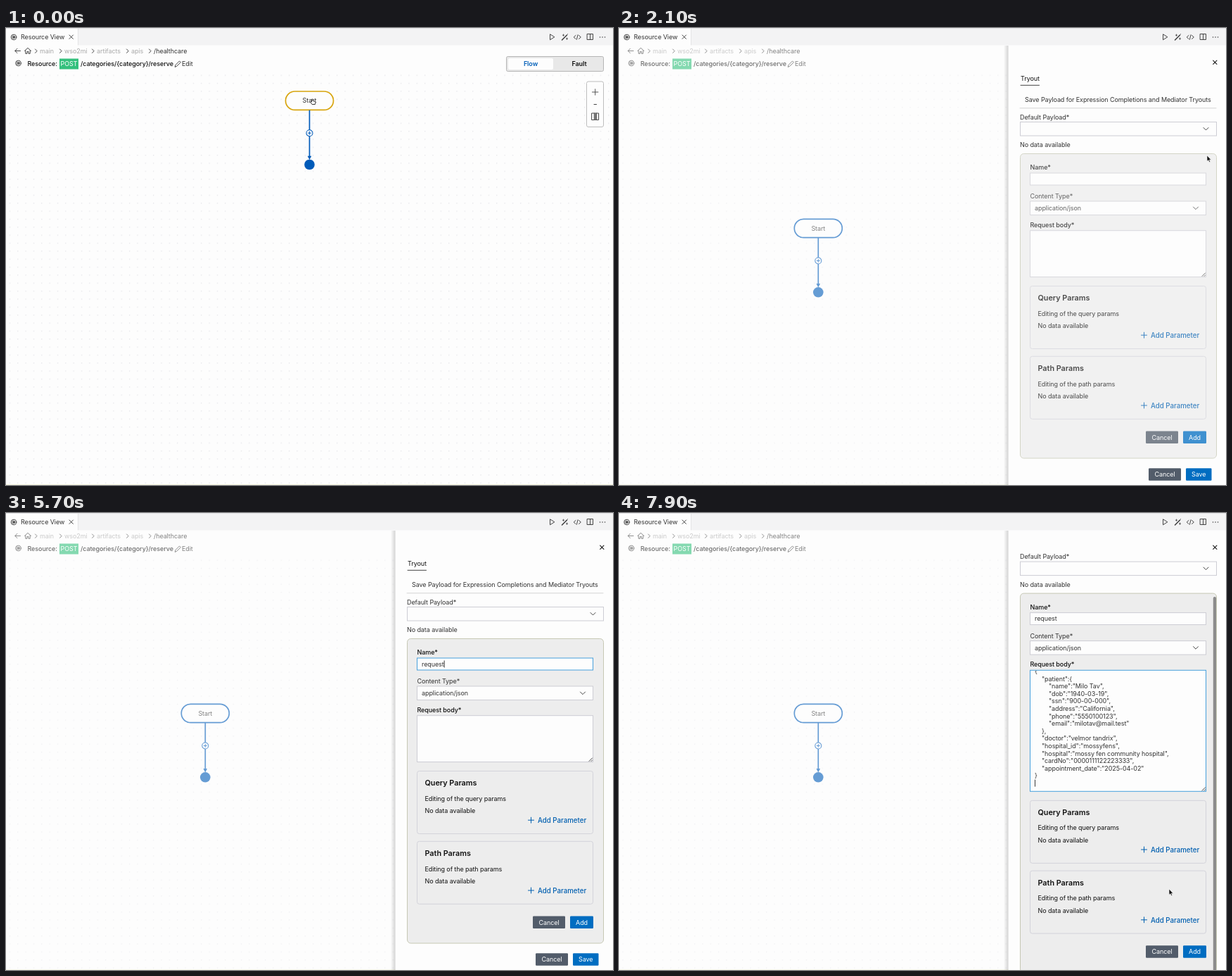
An HTML page for the animation above (8 s loop, 863 by 649 pixels).

```html
<!DOCTYPE html>
<html lang="en">
<head>
<meta charset="utf-8">
<title>Resource View</title>
<style>
html, body { margin: 0; width: 100%; height: 100%; overflow: hidden; background: #fdfdfd; }
svg { display: block; width: 863px; height: 649px; }
text { font: 9px Inter, "Open Sans", sans-serif; letter-spacing: -.09px; fill: #333; white-space: pre; }
.med { font-weight: 500; fill: #111; }
.dark { fill: #111; }
.head { font-size: 10.8px; font-weight: 600; letter-spacing: 0; fill: #111; }
.link { font-size: 9.7px; font-weight: 500; letter-spacing: 0; fill: #005fb0; }
.crumb { fill: #a9a9a9; }
.white { fill: #fff; }
.mid { text-anchor: middle; }
.bold { font-weight: 600; fill: #111; }
.blue { fill: #005fb8; }
.line { fill: none; stroke: #444; stroke-width: 1; stroke-linecap: round; stroke-linejoin: round; }
.box { fill: #fdfdfd; stroke: #cdcdd4; }
.card { fill: none; stroke: #d3d3da; }
</style>
</head>
<body>
<svg id="stage" viewBox="0 0 863 649"></svg>
<script>
const LOOP = 8000, GROWTH = 106.2, SCROLL = 64.4;
const BLUE = '#005bb9', FOCUS = '#47a0dc';
const stage = document.getElementById('stage');

// Text is placed by its vertical centre.
const text = (x, y, s, cls = '') => `<text x="${x}" y="${y + 3.2}" class="${cls}">${s}</text>`;
const line = (d, attrs = '') => `<path class="line" d="${d}" ${attrs}/>`;
const rect = (x, y, w, h, attrs = '') => `<rect x="${x}" y="${y}" width="${w}" height="${h}" ${attrs}/>`;
const chevron = (x, y) => line(`M${x - 3.5} ${y - 1.7}l3.5 3.5 3.5-3.5`);
const plus = (x, y, r, stroke) => line(`M${x - r} ${y}h${2 * r}M${x} ${y - r}v${2 * r}`, `style="stroke:${stroke}"`);
const button = (x, y, w, label, fill) =>
  rect(x, y - 9, w, 17.5, `rx="1.2" fill="${fill}"`) + text(x + w / 2, y, label, 'white mid');
const buttons = (x, y, label, w) =>
  button(x, y, 46, 'Cancel', '#525c6a') + button(x + 53, y, w, label, '#006dc1');
const gear = (x, y) => `<g class="line" transform="translate(${x} ${y})">
  <circle r="3.8"/><circle r="1.9" stroke-width=".8"/><circle r=".6" fill="#333"/>
  <path d="M-2.7-2.7l5.4 5.4M2.7-2.7l-5.4 5.4" stroke-width=".5"/></g>`;

const tabBar = () => rect(0, 0, 863, 24.5, 'fill="#f3f3f4"') + rect(0, 0, 102, 25, 'fill="#fdfdfd"') +
  line('M0 .5H863M102.5 1V24', 'style="stroke:#e4e4e6"') + gear(11, 13) +
  text(21, 12.7, 'Resource View') + line('M90 10l5.4 5.4M95.4 10l-5.4 5.4') +
  line('M773.5 9.2v7.6l6-3.8z') +
  line('M790.5 17l7-7', 'style="stroke-width:1.6"') +
  line('M792.5 9v2.4M791.3 10.2h2.4M797.5 14v2.4M796.3 15.2h2.4M798.5 8.6v.2', 'style="stroke-width:.8"') +
  line('M810 10.5l-2.8 2.5 2.8 2.5M814.5 10.5l2.8 2.5-2.8 2.5M813 9.7l-1.6 6.6') +
  line('M826.5 8.5h8v8h-8zM830.5 8.5v8') +
  [844.5, 848, 851.5].map(x => `<circle cx="${x}" cy="13" r=".8" fill="#444"/>`).join('');

const header = () => {
  const crumbs = [[48, 'main'], [83, 'wso2mi'], [129, 'artifacts'], [178, 'apis'], [210, '/healthcare']];
  return line('M20.5 32.5h-7.5M16 29.3l-3.2 3.2 3.2 3.2') +
    line('M26.5 32.5l4.5-4.2 4.5 4.2M27.8 32v4.3h2.2v-2.8h2v2.8h2.2V32') +
    crumbs.map(([x, s], i) => line(`M${x - 6.5} 30l2.6 2.7-2.6 2.7`) +
      text(x, 32.4, s, i < 4 ? 'crumb' : '')).join('') +
    gear(17.5, 50) + text(30.5, 50.7, 'Resource:', 'med') +
    rect(76, 43.5, 27, 15, 'fill="#34c07d"') + text(89.5, 51, 'POST', 'white mid') +
    text(106, 50.7, '/categories/{category}/reserve', 'med') +
    line('M240.3 55l.8-2.6 5.5-5.5 1.8 1.8-5.5 5.5z') + text(250, 50.7, 'Edit');
};

const controls = () =>
  rect(711.5, 40.5, 138, 21, 'rx="2" fill="#e8e8e8" stroke="#b5b5b5"') +
  rect(714, 43, 64, 16, 'rx="2" fill="#fdfdfd"') +
  text(746, 50.7, 'Flow', 'bold blue mid') + text(815, 50.7, 'Fault', 'bold mid') +
  rect(825.5, 76, 24, 64.5, 'rx="2.5" fill="#fdfdfd" stroke="#bdbdbd"') +
  plus(837.7, 91, 4.2, '#555') + line('M836 108.5h3.5') +
  line('M833 121h9.6v9.5H833zM836.3 121v9.5M839.4 121v9.5') + rect(836.3, 121, 3.1, 9.5, 'fill="#777"');

const diagram = () => `<g id="diagram">
  <rect id="start" x="-34" y="-13.2" width="68" height="26.4" rx="13.2" fill="#fdfdfd" stroke-width="1.7"/>
  ${text(0, 0, 'Start', 'mid')}
  <path d="M0 13.5V80" stroke="${BLUE}" stroke-width="1.7"/>
  <path d="M-2.8 78.5H2.8L0 84z" fill="${BLUE}"/>
  <circle cy="46" r="4.5" fill="#fdfdfd" stroke="${BLUE}" stroke-width="1.1"/>
  ${plus(0, 46, 2, BLUE)}<circle cy="90.8" r="7.3" fill="${BLUE}"/></g>`;

const params = (y, title, kind) =>
  rect(584.5, y, 250, 89, 'rx="3" class="card"') + text(595.5, y + 17.5, title, 'head') +
  text(595.5, y + 39, `Editing of the ${kind} params`, 'dark') +
  text(595.5, y + 56.7, 'No data available', 'dark') +
  plus(746.5, y + 69.7, 4, '#005fb0') + text(756, y + 70.3, 'Add Parameter', 'link');

const body = [
  [0, '{'], [1, '"patient":{'], [2, '"name":"Milo Tav",'], [2, '"dob":"1940-03-19",'],
  [2, '"ssn":"900-00-000",'], [2, '"address":"California",'], [2, '"phone":"5550100123",'],
  [2, '"email":"milotav@mail.test"'], [1, '},'], [1, '"doctor":"velmor tandrix",'],
  [1, '"hospital_id":"mossyfens",'], [1, '"hospital":"mossy fen community hospital",'],
  [1, '"cardNo":"0000111122223333",'], [1, '"appointment_date":"2025-04-02"'], [0, '}']];

const form = () => `<g id="form">
  <rect id="sheet" x="570.5" y="178.5" width="279" height="432.5" rx="5" fill="#ededed" stroke="#c6c8b4"/>
  ${text(584.5, 198, 'Name*', 'med')}
  ${rect(584.5, 206, 250, 17, 'id="nameBox" class="box"')}
  <text id="name" x="591" y="217.8"></text>
  ${text(584.5, 239, 'Content Type*')}${rect(584.5, 246, 250, 19.5, 'class="box"')}
  ${text(591, 255.8, 'application/json')}${chevron(820, 255.8)}
  ${text(584.5, 279.7, 'Request body*', 'med')}
  ${rect(584.5, 287.7, 250, 65.8, 'id="bodyBox" class="box"')}
  <g id="body" clip-path="url(#bodyClip)">
    ${body.map(([depth, s], i) => text(591 + depth * 10, 289.3 + i * 10.6, s)).join('')}</g>
  <path id="caret" stroke="#222" stroke-width=".9"/>
  <g id="below">${line('M829 352.5l4.5-4.5M832 352.5l1.5-1.5', 'stroke-width=".7"')}
    ${params(366.5, 'Query Params', 'query')}${params(466.3, 'Path Params', 'path')}
    ${buttons(749, 581.5, 'Add', 33)}</g></g>`;

const panel = () => `<g id="panel">
  ${rect(547, 25, 7, 624, 'fill="url(#shadow)"')}${rect(553.5, 25, 310, 624, 'fill="#fdfdfd"')}
  ${line('M844.7 46.2l5.2 5.2M849.9 46.2l-5.2 5.2', 'style="stroke:#222;stroke-width:1.2"')}
  <g clip-path="url(#panelClip)"><g id="content">
    ${text(571, 72, 'Tryout', 'dark')}${line('M571 81.3h26.5')}
    ${text(577, 101.7, 'Save Payload for Expression Completions and Mediator Tryouts')}
    ${line('M570 113.8h279', 'style="stroke:#d4d4d4"')}
    ${text(570, 126.7, 'Default Payload*')}${rect(570.5, 133.5, 279, 19.5, 'class="box"')}${chevron(834.5, 143.2)}
    ${text(570, 166, 'No data available')}
    <g id="addRequest">${plus(784, 179.3, 4.2, '#005fb0')}${text(794, 179.5, 'Add request', 'link')}</g>
    ${form()}
    <g id="footer">${buttons(753, 203.5, 'Save', 36.5)}</g></g>
    <rect id="scrollbar" x="844.8" width="4.2" height="600" rx="2" fill="#8c8c8c"/></g></g>`;

stage.innerHTML = `<defs>
  <pattern id="dots" width="11.35" height="11.35" patternUnits="userSpaceOnUse" y="5">
    <circle cx="5.5" cy="5.5" r=".6" fill="#d0d0d8"/></pattern>
  <linearGradient id="shadow"><stop offset="0" stop-color="#000" stop-opacity="0"/>
    <stop offset="1" stop-color="#000" stop-opacity=".18"/></linearGradient>
  <clipPath id="panelClip">${rect(553, 56, 310, 593)}</clipPath>
  <clipPath id="bodyClip">${rect(585, 288.2, 249, 171)}</clipPath></defs>
  ${rect(0, 0, 863, 649, 'fill="#fdfdfd"')}${rect(0, 64, 863, 585, 'fill="url(#dots)"')}
  ${line('M0 648.5H863', 'style="stroke:#f4f4dd"')}
  ${header()}${controls()}${diagram()}
  ${rect(0, 25, 863, 624, 'id="veil" fill="#fdfdfd" opacity=".4"')}
  ${panel()}${tabBar()}
  <g id="cursor">
    <path id="arrow" d="M0 0v8.3l1.9-1.6 1.4 2.8 1.3-.6-1.3-2.7h2.5z" fill="#111" stroke="#fff" stroke-width=".6"/>
    <path id="beam" class="line" d="M-1.6-4.5q1.6 0 1.6 1.3v6.4q0 1.3-1.6 1.3M1.6-4.5q-1.6 0-1.6 1.3M0 3.2q0 1.3 1.6 1.3"/>
    <path id="hand" d="M-1.5 0v-3.6q.9-1.1 1.6 0v2l3.2.8q.8.4.7 1.4l-.6 2.9H-.8l-2.5-3.2q.3-1.1 1.8-.3z" fill="#fff" stroke="#222" stroke-width=".9"/>
  </g>`;

const $ = id => document.getElementById(id);
const show = (id, on) => $(id).style.display = on ? '' : 'none';
const move = (id, x, y) => $(id).setAttribute('transform', `translate(${x} ${y})`);
const ramp = (t, a, b) => Math.min(1, Math.max(0, (t - a) / (b - a)));
const ease = p => p * p * (3 - 2 * p);
const mix = (a, b, p) => a + (b - a) * p;

const AT = { open: 400, form: 2000, nameFocus: 3300, typing: 4300, bodyFocus: 6300, paste: 6700, scroll: 7450 };
const KEY_GAP = 200, WORD = 'request';
const path = [[0, 436, 105], [600, 436, 105], [1050, 654, 137], [1250, 654, 137], [1700, 836, 181],
  [2400, 836, 181], [2900, 712, 206], [3200, 690, 214], [5800, 690, 214], [6200, 700, 318],
  [6950, 700, 318], [7350, 782, 534], [LOOP, 782, 534]];

function drawCursor(t) {
  const i = path.findIndex(([time]) => time > t);
  const [t0, x0, y0] = path[i - 1], [t1, x1, y1] = path[i];
  const p = ease(ramp(t, t0, t1));
  move('cursor', mix(x0, x1, p), mix(y0, y1, p));
  const within = (a, b) => t >= a && t < b;
  const shape = t < AT.open || within(1600, AT.form) ? 'hand'
    : within(1000, 1300) || within(3100, 5900) || within(6100, 7050) ? 'beam' : 'arrow';
  for (const id of ['arrow', 'beam', 'hand']) show(id, id === shape);
  show('cursor', !within(AT.typing, 5800) && !within(AT.paste, 6950));
}

function drawCaret(t, inBody, pasted, typed) {
  const last = pasted ? AT.paste : inBody ? AT.bodyFocus
    : typed ? AT.typing + (typed - 1) * KEY_GAP : AT.nameFocus;
  const x = inBody || !typed ? 591.5 : 591.5 + $('name').getComputedTextLength();
  const y = pasted ? 443 : inBody ? 292 : 209.5;
  $('caret').setAttribute('d', `M${x} ${y}v10`);
  show('caret', t >= AT.nameFocus && Math.floor((t - last) / 500) % 2 === 0);
}

function draw(t) {
  const open = t >= AT.open, hasForm = t >= AT.form;
  const inBody = t >= AT.bodyFocus, pasted = t >= AT.paste;
  const growth = pasted ? GROWTH : 0;

  move('diagram', open ? 283.3 : 431.5, open ? 284.5 : 103.2);
  $('start').setAttribute('stroke', open ? BLUE : '#d8a50e');
  show('veil', open);
  show('panel', open);
  move('panel', 310 * (1 - ease(ramp(t, AT.open - 100, AT.open + 200))), 0);

  show('addRequest', !hasForm);
  show('form', hasForm);
  $('form').setAttribute('opacity', mix(.5, 1, ramp(t, AT.form, AT.form + 200)));
  move('footer', 0, hasForm ? 430.7 + growth : 0);
  move('below', 0, growth);
  $('sheet').setAttribute('height', 432.5 + growth);
  $('bodyBox').setAttribute('height', 65.8 + growth);
  show('body', pasted);

  const typed = Math.min(WORD.length, Math.max(0, Math.floor((t - AT.typing) / KEY_GAP) + 1));
  $('name').textContent = WORD.slice(0, typed);
  $('nameBox').style.stroke = t >= AT.nameFocus && !inBody ? FOCUS : '';
  $('bodyBox').style.stroke = inBody ? FOCUS : '';
  drawCaret(t, inBody, pasted, typed);

  const scrolled = ease(ramp(t, AT.scroll, AT.scroll + 400));
  move('content', 0, -SCROLL * scrolled);
  show('scrollbar', scrolled > 0);
  $('scrollbar').setAttribute('y', mix(57, 119, scrolled));
  drawCursor(t);
}

const began = performance.now();
function tick() {
  const t = (performance.now() - began) % LOOP;
  draw(Math.floor(t / 100) * 100);
  requestAnimationFrame(tick);
}
tick();
</script>
</body>
</html>
```
